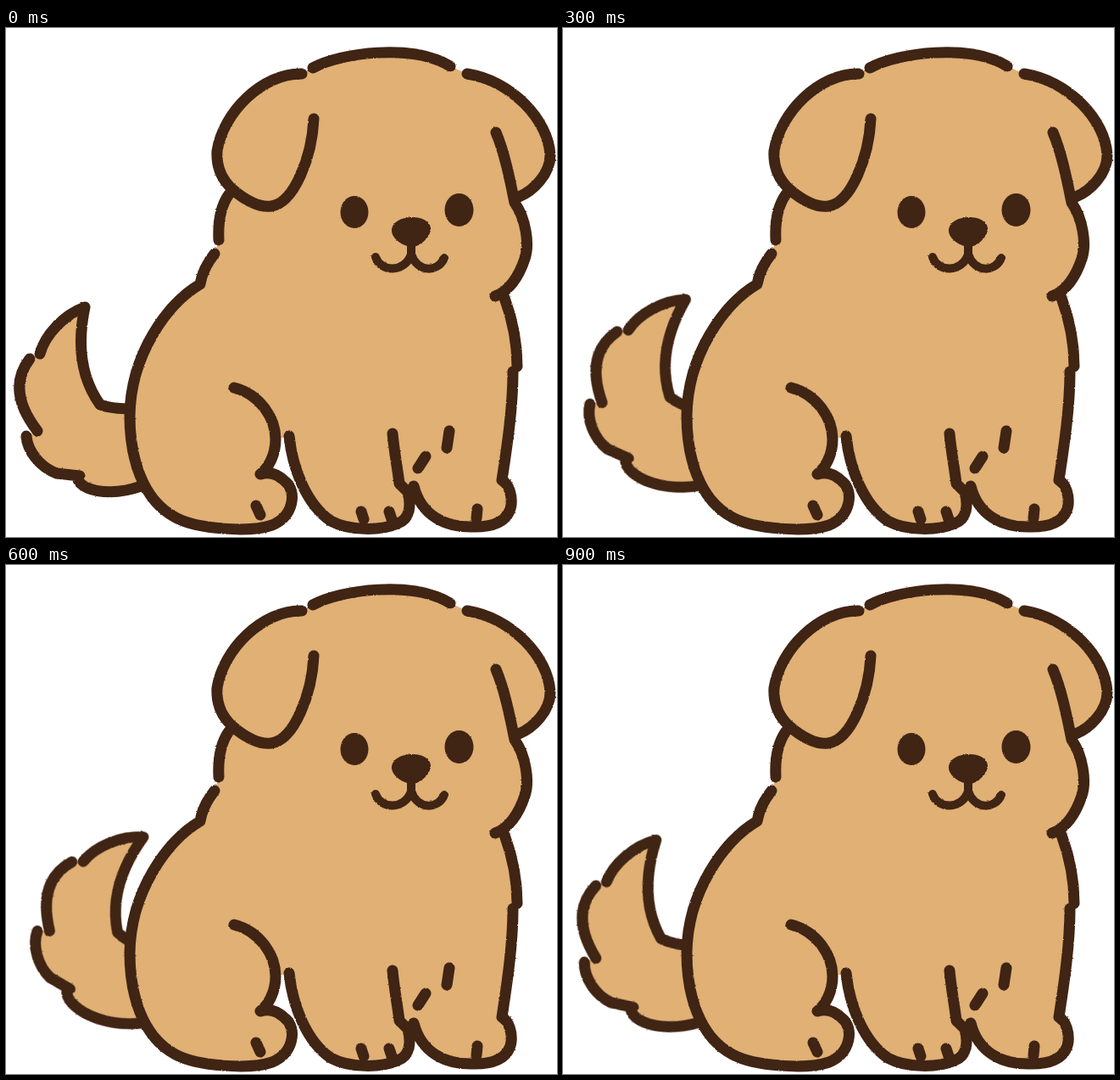
These frames come from a looping animation (650 px wide and 600 px high, 1000 ms). An HTML page:

```html
<!DOCTYPE html>
<html lang="en">
<head>
<meta charset="utf-8">
<title>Puppy wagging its tail</title>
<style>
  html, body { margin: 0; width: 100%; height: 100%; overflow: hidden; background: #fff; }
  svg { display: block; width: 650px; height: 600px; }
  .fur { fill: #e0b074; }
  .line { fill: none; stroke: #402414; stroke-width: 13; stroke-linecap: round; stroke-linejoin: round; }
  .mouth { stroke-width: 10; }
  .dark { fill: #402414; }
</style>
</head>
<body>
<svg viewBox="0 0 650 600">
  <!-- rough crayon edge -->
  <filter id="rough" filterUnits="userSpaceOnUse" x="-20" y="-20" width="690" height="640" color-interpolation-filters="sRGB">
    <feTurbulence type="fractalNoise" baseFrequency=".4" numOctaves="2" seed="4"/>
    <feDisplacementMap in="SourceGraphic" scale="2" xChannelSelector="R" yChannelSelector="G"/>
  </filter>

  <g id="tail">
    <g filter="url(#rough)">
      <path class="fur" d="M40 384C46 362 68 338 93 329C84 372 88 412 111 444Q124 449 150 449L185 450L195 520
        C148 558 88 550 84 530L60 525C40 518 25 498 24 481L37 475C10 440 11 412 28 390Z"/>
      <path class="line" d="M40 384C46 362 68 338 93 329C84 372 88 412 111 444Q124 449 150 449
        M28 390C11 412 10 440 37 475
        M24 481C25 498 40 518 60 525L87 528
        M84 530C88 550 148 558 195 520"/>
    </g>
  </g>

  <g filter="url(#rough)">
    <path class="fur" d="M362 47C395 29 480 18 524 45L544 54C596 62 640 108 642 150C642 172 622 192 605 199L601 207
      C613 224 618 255 612 272C605 293 593 311 577 316L588 318C598 345 603 370 603 399L598 405
      C598 450 590 500 585 533C594 538 597 552 596 562C593 583 572 589 548 588C518 588 490 575 481 540L474 547
      C478 562 477 579 462 584C442 593 405 593 383 581C355 562 338 520 334 481L318 485C318 505 308 520 300 526
      C312 522 322 527 330 535C343 546 340 575 314 586C288 595 226 591 200 577C160 556 146 505 146 457
      C147 385 190 325 229 302C231 290 238 276 246 266L251 250C250 230 252 210 265 192
      C254 178 248 162 249 145C256 100 302 53 349 54Z"/>
    <!-- head and ears -->
    <path class="line" d="M362 47C395 29 480 18 524 45
      M349 54C302 53 256 100 249 145C248 162 254 178 267 190C283 204 300 212 313 210C340 206 361 152 363 107
      M544 54C596 62 640 108 642 150C642 172 622 192 605 199
      M578 123C588 147 594 176 600 206C613 224 618 255 612 272C605 293 593 311 577 316
      M263 196C253 210 250 230 251 250"/>
    <!-- back, hind leg and paw -->
    <path class="line" d="M246 266C238 276 231 290 229 302C190 325 147 385 146 457C146 505 160 556 200 577
      C226 591 288 595 314 586C340 575 343 546 330 535C322 527 312 522 300 526
      C308 520 318 505 318 485C318 460 300 432 269 424
      M295 563L300 574"/>
    <!-- chest and front legs -->
    <path class="line" d="M588 318C598 345 603 370 603 399
      M598 405C598 450 590 500 585 533C594 538 597 552 596 562C593 583 572 589 548 588C518 588 490 575 481 540
      M456 478C458 500 462 520 464 537L474 547C478 562 477 579 462 584C442 593 405 593 383 581C355 562 338 520 334 481
      M419 570L422 579M452 570L455 579M556 567L555 578M495 505L486 519M523 475L520 495"/>
    <!-- face -->
    <ellipse class="dark" cx="411" cy="217" rx="16.5" ry="19"/>
    <ellipse class="dark" cx="534.5" cy="214.5" rx="17" ry="19.5"/>
    <path class="dark" d="M455 238C457 219 499 218 501 236C502 246 488 258 479 258C468 258 454 247 455 238Z"/>
    <path class="line mouth" d="M436 270C442 288 470 289 478 267V255M478 267C486 289 510 288 517 271"/>
  </g>
</svg>
<script>
  const tail = document.getElementById("tail");

  // Swings from 0 to 30 degrees and back in ten 100 ms steps.
  function draw(now) {
    const step = Math.floor(now / 100) % 10;
    const angle = 6 * (5 - Math.abs(5 - step));
    tail.setAttribute("transform", `rotate(${angle} 147 487)`);
    requestAnimationFrame(draw);
  }
  draw(0);
</script>
</body>
</html>
```
